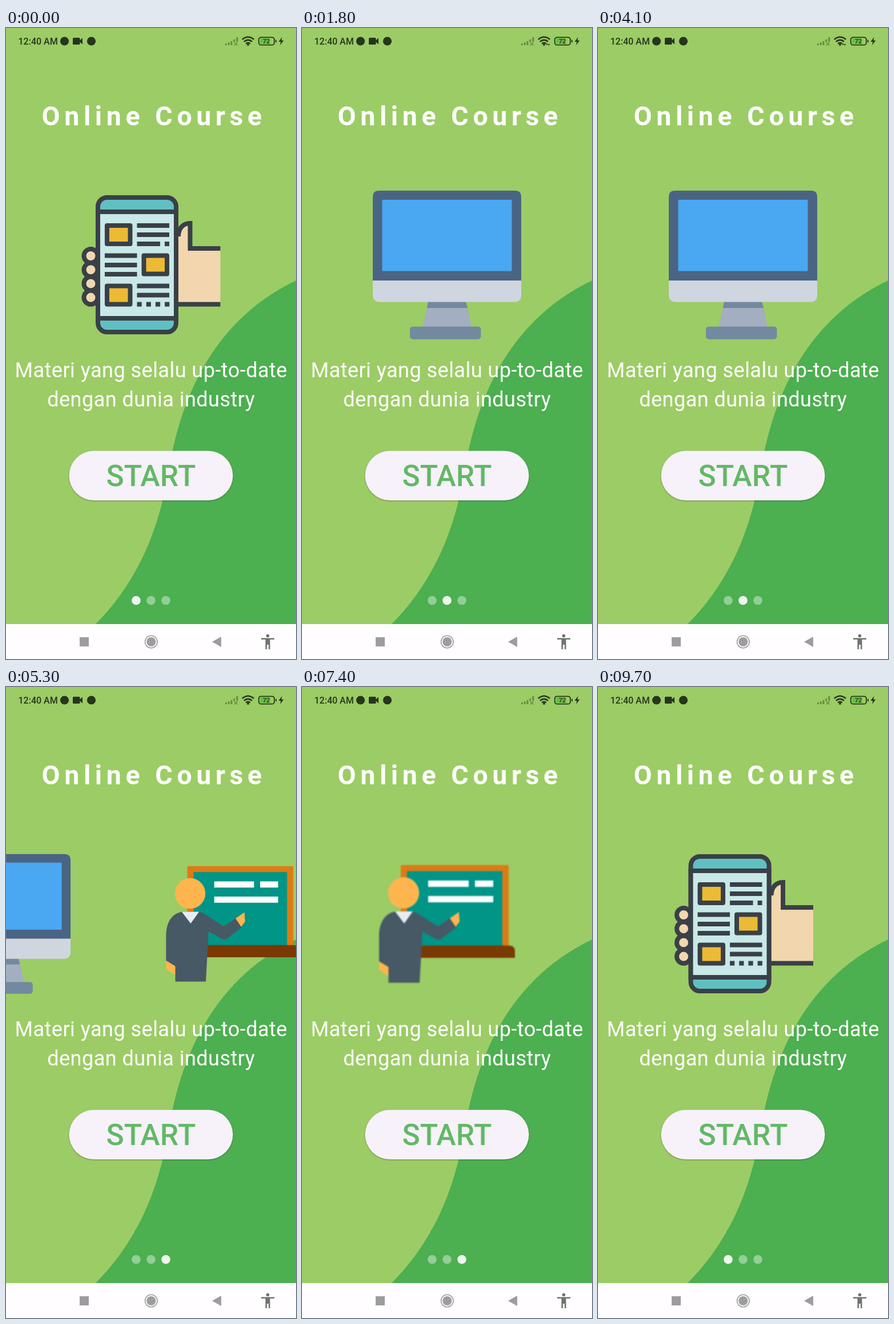
An HTML page for the animation above (9800 ms loop, 508 by 1102 pixels).

```html
<!DOCTYPE html>
<html lang="id">
<head>
<meta charset="utf-8">
<title>Online Course</title>
<style>
  html, body { margin: 0; width: 100%; height: 100%; overflow: hidden; background: #9ccc65; }
  svg { display: block; width: 100vw; height: 100vh; }
  text { font-family: Roboto, sans-serif; }
  .title { font-size: 46.5px; font-weight: 700; letter-spacing: 7.6px; fill: #fff; }
  .body { font-size: 36.2px; letter-spacing: .4px; text-anchor: middle; fill: #fff; }
  .start { font-size: 51.7px; font-weight: 500; letter-spacing: .1px; text-anchor: middle; fill: #62b966; }
  .button { fill: #f7f1fa; filter: drop-shadow(0 1.5px 1px rgba(0, 0, 0, .32)); }
  .teacher { filter: blur(.8px); }
  #dots circle { fill: #fff; }
</style>
</head>
<body>
<svg viewBox="0 0 508 1102" preserveAspectRatio="none">
  <rect width="508" height="1102" fill="#9ccc65"/>
  <path fill="#4caf50" d="M508 441Q324 529 284 778Q258 940 157 1041H508Z"/>

  <!-- Status bar -->
  <g fill="#26351c">
    <text x="21.5" y="28.8" font-size="16" font-weight="500">12:40 AM</text>
    <circle cx="102.5" cy="23" r="7.6"/>
    <circle cx="149.5" cy="23" r="7.6"/>
    <path d="M118.500 17H128Q129.500 17 129.500 18.500V21.500L134 17.500V28.500L129.500 24.500V27.500Q129.500 29 128 29H118.500Q117 29 117 27.500V18.500Q117 17 118.500 17Z"/>
    <g opacity=".42">
      <path d="M384 27h3v3h-3zM388.700 25h3v5h-3zM393.400 23h3v7h-3zM398.100 20h3v4h-3zM403.300 16h3v8h-3z"/>
      <path d="M399.500 25l6 5.500m0-5.500l-6 5.500" fill="none" stroke="#26351c" stroke-width="1.6"/>
    </g>
    <path d="M413.800 20Q424 11.500 434.200 20M417 23.800Q424 18 431 23.800M420.200 27.200Q424 24.200 427.800 27.200" fill="none" stroke="#26351c" stroke-width="2.500"/>
    <circle cx="424" cy="29" r="2"/>
    <path id="traffic" d="M427.500 29.500l1.700-3 1.700 3zM430.800 28l1.700 3 1.700-3z"/>
    <rect x="442.800" y="16.300" width="27.200" height="13.400" rx="4" fill="none" stroke="#26351c" stroke-width="1.800"/>
    <rect x="445" y="18.500" width="17.500" height="9" rx="1.500" fill="#5fc043"/>
    <rect x="472" y="20.500" width="1.800" height="5" rx=".9"/>
    <text x="456" y="27" font-size="11" font-weight="500" text-anchor="middle">72</text>
    <path d="M483.500 16L477.500 24H481.300L480 30L486.500 21.700H482.600Z"/>
  </g>

  <text class="title" x="62.6" y="169.700">Online Course</text>

  <!-- Slides -->
  <g class="slide" transform="translate(.5 0)">
    <g stroke="#394047" stroke-width="8">
      <path fill="#f1d6ae" stroke="none" d="M302 362C302 350 310 341 323 341V385H375.500V482H300Z"/>
      <path fill="none" d="M302 364C302 350 310 341 322.500 341V385H375.500M300 482.500H375.500"/>
      <g id="fingers" fill="#f1d6ae"></g>
      <rect x="161" y="296" width="137" height="235" rx="16" fill="#60c0c1"/>
      <rect x="161" y="321" width="137" height="186" fill="#c9e8e8"/>
      <g fill="#edba35" stroke-linejoin="round">
        <path d="M177 345h40.500v32h-40.500zM241.500 397.500h40.500v32h-40.500zM177 450.500h40.500v32h-40.500z"/>
      </g>
      <path fill="none" d="M229.500 345h56.500M229.500 361h56.500M229.500 377h40.500m8 0h8M173 397.500h56.500M173 414h56.500M173 430h56.500M229.500 450.500h56.500M229.500 466.500h56.500"/>
      <path fill="none" d="M229.500 482.500h58" stroke-dasharray="8.200 8"/>
    </g>
  </g>

  <g class="slide">
    <path fill="#a3aec0" d="M219 488H290L297 522H211Z"/>
    <path fill="#73899f" d="M221 477H287L290 489H218.500Z"/>
    <rect x="189" y="521.500" width="124.500" height="22" rx="5" fill="#73899f"/>
    <rect x="124" y="284" width="260" height="194.500" rx="11" fill="#cfd6e0"/>
    <path fill="#4a6484" d="M124 441V295Q124 284 135 284H373Q384 284 384 295V441Z"/>
    <rect x="140.500" y="300" width="227" height="124.500" fill="#49a8f1"/>
  </g>

  <g class="slide">
    <g class="teacher">
      <rect x="173" y="311" width="189" height="145" fill="#dd7b14"/>
      <rect x="184" y="321.500" width="167" height="131" fill="#009587"/>
      <path fill="#793900" d="M200 451.500H362Q373 451.500 373 462V473H200Z"/>
      <path fill="#fff" d="M221 338h71v11h-71zM303 338h32v11h-32zM221 365h114v11h-114z"/>
      <circle cx="178" cy="359.500" r="27.200" fill="#ffb54e"/>
      <path fill="#ffb54e" d="M259 404L275 393L276 410L268 420ZM135 478L152 487V505L135 494Z"/>
      <path fill="#465965" d="M165 392C145 394 135 412 135 435V479L151.500 489V516.500H206L211 427L234 440Q239 442.500 244 439.500L270 420L259 404L238 418L205 397Q198 392 190 392Z"/>
      <path fill="#e6edf2" d="M163 392H194L179 413Z"/>
    </g>
  </g>

  <text class="body" x="254.200" y="609.700">Materi yang selalu up-to-date</text>
  <text class="body" x="254.200" y="661.200">dengan dunia industry</text>
  <rect class="button" x="110.500" y="738.500" width="287" height="86.500" rx="43.250"/>
  <text class="start" x="254" y="800">START</text>

  <g id="dots">
    <circle cx="228" cy="999.700" r="7.800"/>
    <circle cx="254" cy="999.700" r="7.800"/>
    <circle cx="280" cy="999.700" r="7.800"/>
  </g>

  <!-- Navigation bar -->
  <rect y="1041" width="508" height="61" fill="#fffdff"/>
  <g fill="#9e9d9e">
    <rect x="129" y="1064" width="16" height="16"/>
    <circle cx="254.300" cy="1072" r="10.700" fill="none" stroke="#9e9d9e" stroke-width="1.600"/>
    <circle cx="254.300" cy="1072" r="8"/>
    <path d="M361 1072L377 1063V1081Z"/>
  </g>
  <g fill="#70736f">
    <circle cx="458.500" cy="1061.500" r="2.800"/>
    <path d="M447 1065.500H470V1068H462.500V1085H460V1077H457V1085H454.500V1068H447Z"/>
  </g>
</svg>
<script>
  const LOOP = 9800, FRAME = 100, SLIDE_MS = 800;
  const PAGE_WIDTH = 406.4, CENTER_X = 254, CENTER_Y = 413.7;
  const slideStarts = [966, 4966, 8966];
  const slides = [...document.querySelectorAll('.slide')];
  const dots = [...document.querySelectorAll('#dots circle')];
  const traffic = document.getElementById('traffic');

  const svgNS = 'http://www.w3.org/2000/svg';
  for (let i = 0; i < 4; i++) {
    const finger = document.createElementNS(svgNS, 'circle');
    finger.setAttribute('cx', 148.5);
    finger.setAttribute('cy', 398 + i * 24.2);
    finger.setAttribute('r', 12);
    document.getElementById('fingers').append(finger);
  }

  const clamp = v => Math.min(1, Math.max(0, v));

  function cubicBezier(x1, y1, x2, y2) {
    const at = (a, b, u) => 3 * a * u * (1 - u) ** 2 + 3 * b * u * u * (1 - u) + u ** 3;
    return x => {
      if (x <= 0 || x >= 1) return clamp(x);
      let lo = 0, hi = 1;
      for (let i = 0; i < 24; i++) {
        const mid = (lo + hi) / 2;
        if (at(x1, x2, mid) < x) lo = mid; else hi = mid;
      }
      return at(y1, y2, lo);
    };
  }
  const fastOutSlowIn = cubicBezier(.4, 0, .2, 1);
  const easeOut = cubicBezier(0, 0, .58, 1);

  function render(t) {
    const page = slideStarts.reduce((sum, s) => sum + fastOutSlowIn((t - s) / SLIDE_MS), 0);
    slides.forEach((slide, i) => {
      const offset = (i - page + 4.5) % 3 - 1.5;
      const scale = easeOut(1 - Math.abs(offset) * .3);
      slide.setAttribute('transform',
        `translate(${CENTER_X + offset * PAGE_WIDTH} ${CENTER_Y}) scale(${scale}) translate(${-CENTER_X} ${-CENTER_Y})`);
    });
    const active = Math.round(page) % 3;
    dots.forEach((dot, i) => dot.setAttribute('opacity', i === active ? .9 : .4));
    traffic.setAttribute('opacity', t >= 1000 && t < 5000 ? 1 : 0);
  }

  const origin = performance.now();
  function tick() {
    const elapsed = (performance.now() - origin) % LOOP;
    render(Math.floor(elapsed / FRAME) * FRAME);
    requestAnimationFrame(tick);
  }
  tick();
</script>
</body>
</html>
```
